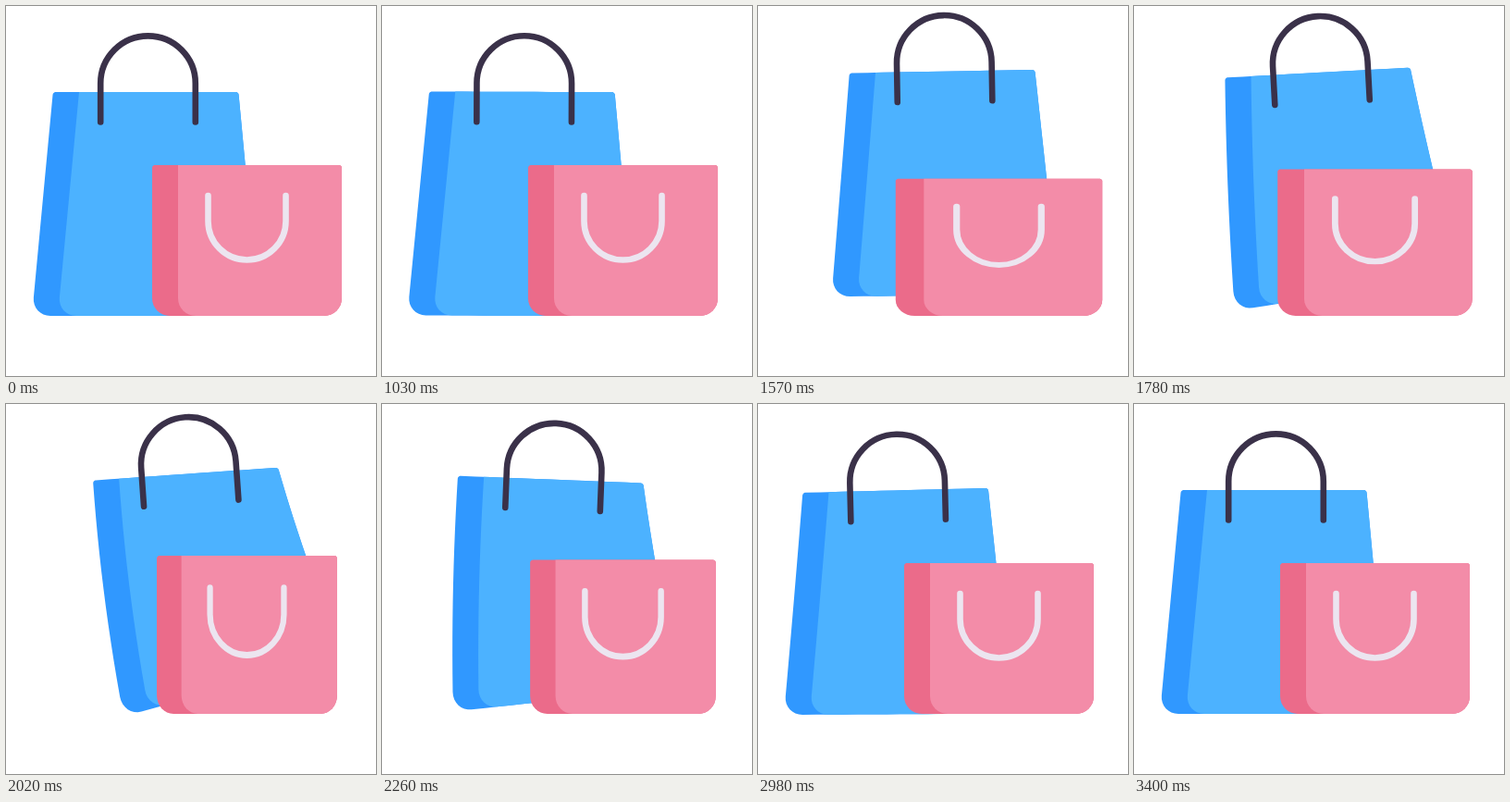
Animation of 400x400 px, one loop 3.43 s. Source, as an HTML page with a canvas:

```html
<!DOCTYPE html>
<html lang="en">
<head>
<meta charset="utf-8">
<title>Shopping bags</title>
<style>
  html, body { margin: 0; width: 100%; height: 100%; overflow: hidden; background: #fff; }
  canvas { display: block; width: 400px; height: 400px; }
</style>
</head>
<body>
<canvas id="stage" width="400" height="400"></canvas>
<script>
const ctx = document.getElementById('stage').getContext('2d');
const LOOP = 3430;
const DEG = Math.PI / 180;
const TOP = { x: 151, y: 93 };
const HEIGHT = 242;

// time, then the blue bag's offset x, y, tilt of its top edge, swing of its body, and the pink bag's squash
const POSES = [
  [1010, 0, 0, 0, 0, 0],
  [1210, 13, -9, 6, 6.5, 0.028],         // lift
  [1570, 48, -22.3, -1, -0.8, 0.09],     // top of the hop
  [2020, 43, -17.3, -4, -12.7, -0.049],  // swing through
  [2500, 17.6, -5.5, 8.4, 4.4, 0.007],   // land
  [2980, -2.5, 0.4, -1.4, -0.6, 0],      // settle
  [3400, 0, 0, 0, 0, 0]
];

const lerp = (a, b, u) => a + (b - a) * u;
const toward = (p, q, u) => [lerp(p[0], q[0], u), lerp(p[1], q[1], u)];

// Slope at a pose: zero at the ends and at turning points
function slope(i, col) {
  const a = POSES[i - 1], b = POSES[i], c = POSES[i + 1];
  if (!a || !c || (b[col] - a[col]) * (c[col] - b[col]) <= 0) return 0;
  return (c[col] - a[col]) / (c[0] - a[0]);
}

function poseAt(time) {
  const next = POSES.findIndex(pose => pose[0] > time);
  if (next < 1) return POSES[0];
  const a = POSES[next - 1], b = POSES[next], span = b[0] - a[0];
  const u = (time - a[0]) / span, v = 1 - u;
  return a.map((from, col) =>
    from * v * v * (1 + 2 * u) + b[col] * u * u * (3 - 2 * u) +
    span * u * v * (slope(next - 1, col) * v - slope(next, col) * u));
}

// Samples a polygon of [x, y, radius] corners into points with rounded corners
function outline(corners) {
  const points = [], n = corners.length;
  const cut = (p, q) => toward(p, q, p[2] / Math.hypot(q[0] - p[0], q[1] - p[1]));
  corners.forEach((p, i) => {
    const next = corners[(i + 1) % n];
    const a = cut(p, corners[(i + n - 1) % n]), b = cut(p, next), end = cut(next, p);
    const c = toward(a, p, 0.55), d = toward(b, p, 0.55);
    for (let u = 0; u <= 1; u += 0.125) {
      const ac = toward(a, c, u), cd = toward(c, d, u), db = toward(d, b, u);
      points.push(toward(toward(ac, cd, u), toward(cd, db, u), u));
    }
    for (let k = 1; k < 12; k++) points.push(toward(b, end, k / 12));
  });
  return points;
}

const blueShape = (topLeft, lowLeft, radius) =>
  outline([[topLeft, 93, radius], [251.3, 93, 3], [274, 335, 45], [lowLeft, 335, 20]]);
const pinkShape = (left, radius) =>
  outline([[left, 172, radius], [363, 172, 3], [363, 335, 19], [left, 335, 19]]);
const blueBody = blueShape(50.8, 28, 3), blueFront = blueShape(79, 56, 0);
const pinkBody = pinkShape(158, 3), pinkFront = pinkShape(186, 0);
const blueHandle = new Path2D('M102.2 125.5V83.7a51.3 51.3 0 0 1 102.6 0V125.5');
const pinkHandle = new Path2D('M218.5 205V232.5a42 42 0 0 0 84 0V205');

// Bends the blue bag: the body trails its top edge, and the base turns a little further
function bend(x, y, tilt, swing) {
  const lag = swing - tilt, turn = lag * 4 / 3;
  const length = HEIGHT * Math.cos(1.6 * lag * DEG);
  const lean = [-length * Math.sin(swing * DEG), length * Math.cos(swing * DEG)];
  return ([px, py]) => {
    const s = (py - TOP.y) / HEIGHT, side = px - TOP.x;
    const angle = (tilt + turn * s) * DEG;
    return [
      TOP.x + x + lean[0] * s + 1.1 * turn * s * (1 - s) + side * Math.cos(angle),
      TOP.y + y + lean[1] * s + side * Math.sin(angle)
    ];
  };
}

function fill(points, color) {
  ctx.beginPath();
  points.forEach(p => ctx.lineTo(p[0], p[1]));
  ctx.fillStyle = color;
  ctx.fill();
}

function stroke(path, color) {
  ctx.lineWidth = 6.6;
  ctx.lineCap = 'round';
  ctx.strokeStyle = color;
  ctx.stroke(path);
}

// Runs paint with (x, y) moved to (toX, toY) as the centre of a rotation and scaling
function placed(x, y, toX, toY, angle, scaleX, scaleY, paint) {
  ctx.save();
  ctx.translate(toX, toY);
  ctx.rotate(angle * DEG);
  ctx.scale(scaleX, scaleY);
  ctx.translate(-x, -y);
  paint();
  ctx.restore();
}

function draw(time) {
  const [, x, y, tilt, swing, squash] = poseAt(time);
  const warp = bend(x, y, tilt, swing);
  ctx.fillStyle = '#fff';
  ctx.fillRect(0, 0, 400, 400);

  fill(blueBody.map(warp), '#3098ff');
  fill(blueFront.map(warp), '#4cb2ff');
  const joint = [TOP.x, 109];
  placed(...joint, ...warp(joint), tilt, 1, 1, () => stroke(blueHandle, '#3a3149'));

  placed(260.5, 335, 260.5, 335, 0, 1 + squash, 1 - squash, () => {
    fill(pinkBody, '#eb6b8a');
    fill(pinkFront, '#f38ca8');
    stroke(pinkHandle, '#ece5f0');
  });
}

const start = performance.now();
function tick() {
  draw((performance.now() - start) % LOOP);
  requestAnimationFrame(tick);
}
tick();
</script>
</body>
</html>
```
